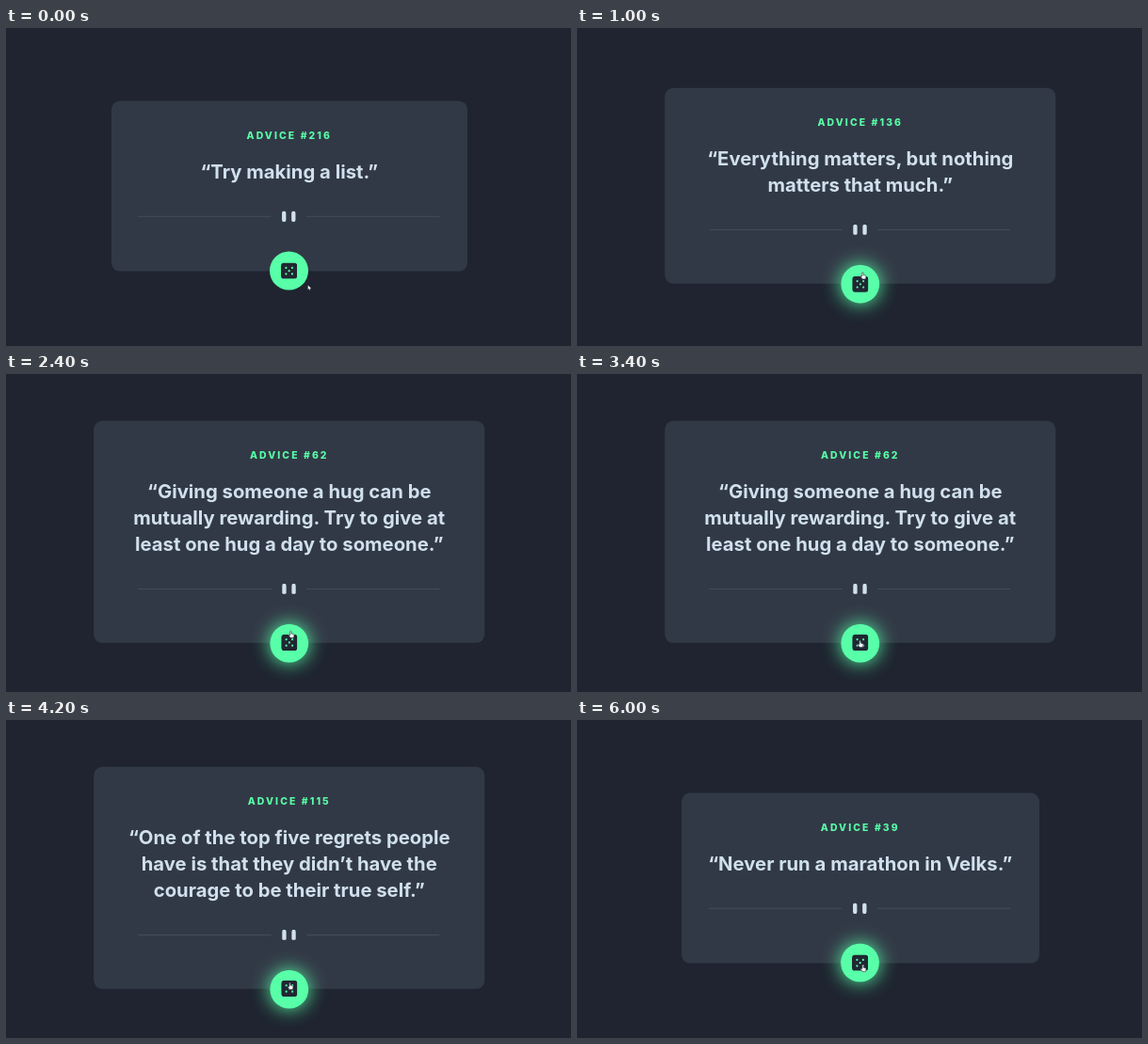
An HTML page for the animation above (6100 ms loop, 600 px wide and 338 px high).

```html
<!DOCTYPE html>
<html lang="en">
<head>
<meta charset="utf-8">
<title>Advice generator</title>
<style>
  :root { --green: #58ffa8; --pale: #d0e0ec; --bg: #1f2430; }
  html, body { margin: 0; width: 100%; height: 100%; overflow: hidden; background: var(--bg); }
  #stage { position: relative; width: 600px; height: 338px; overflow: hidden; font-family: Inter, sans-serif; }
  #card {
    position: absolute; left: 300.75px; top: 167.8px; transform: translate(-50%, -50%);
    border-radius: 9px; background: #323946; text-align: center;
  }
  #label {
    position: absolute; left: 0; right: 0; top: 29px; line-height: 16px;
    font-size: 10.4px; font-weight: 800; letter-spacing: 2.1px; color: var(--green);
  }
  #quote {
    position: absolute; left: 0; right: 0; top: 61.2px; line-height: 27.85px;
    font-size: 20.3px; font-weight: 700; white-space: pre; color: var(--pale);
  }
  #rule { position: absolute; left: 50%; bottom: 52px; width: 320.5px; height: 11.55px; margin-left: -160.7px; }
  #roller { position: absolute; left: 50%; top: 90px; overflow: visible; width: 1px; height: 1px; fill: #fff; }
  #button {
    position: absolute; left: 50%; bottom: -20.4px; width: 41px; height: 41px; margin-left: -20.5px;
    border-radius: 50%; background: var(--green);
  }
  #glow { position: absolute; inset: 0; border-radius: 50%; box-shadow: 0 0 20px var(--green); }
  #dice { position: absolute; left: 11.7px; top: 11.85px; width: 17.3px; height: 17.3px; }
  #cursor { position: absolute; left: 0; top: 0; width: 1px; height: 1px; overflow: visible; }
</style>
</head>
<body>
<div id="stage">
  <div id="card">
    <div id="label"></div>
    <div id="quote"></div>
    <svg id="roller"></svg>
    <svg id="rule" viewBox="0 0 444 16">
      <path d="M0 8h196M248 8h196" stroke="#4a5565"/>
      <g fill="#d0e0ec"><rect x="212" width="6" height="16" rx="3"/><rect x="226" width="6" height="16" rx="3"/></g>
    </svg>
    <div id="button">
      <div id="glow"></div>
      <svg id="dice" viewBox="0 0 24 24">
        <rect width="24" height="24" rx="5" fill="#202733"/>
        <g fill="#58ffa8">
          <circle cx="7.5" cy="7.5" r="1.5"/><circle cx="16.5" cy="7.5" r="1.5"/><circle cx="12" cy="12" r="1.5"/>
          <circle cx="7.5" cy="16.5" r="1.5"/><circle cx="16.5" cy="16.5" r="1.5"/>
        </g>
      </svg>
    </div>
  </div>
  <svg id="cursor">
    <path id="arrow" d="M-1.5-3V2.4L-.2 1.3.6 3 1.5 2.6.8 1H2.4Z" fill="#fff" stroke="#111" stroke-width=".4"/>
    <path id="hand" d="M-1.2-3.4q.7-.7 1.3 0V-1l2.2.5q.8.3.7 1.2L2.5 3.4H-.9L-2.8.7q0-.9.8-.7l.8.6Z" fill="#fff" stroke="#202733" stroke-width=".6"/>
  </svg>
</div>
<script>
  const LOOP = 6100, STEP = 100;
  const $ = id => document.getElementById(id);

  // Each scene opens with the roller (from `load`) and shows its quote from `show`.
  const scenes = [
    { load: 0, show: 0, no: 216, width: 378, text: '“Try making a list.”' },
    { load: 700, show: 1000, no: 136, width: 415.5, text: '“Everything matters, but nothing\nmatters that much.”' },
    { load: 2100, show: 2400, no: 62, width: 415.5, text: '“Giving someone a hug can be\nmutually rewarding. Try to give at\nleast one hug a day to someone.”' },
    { load: 3600, show: 3900, no: 115, width: 415.5, text: '“One of the top five regrets people\nhave is that they didn’t have the\ncourage to be their true self.”' },
    { load: 5000, show: 5300, no: 39, width: 380, text: '“Never run a marathon in Velks.”' }
  ];

  // [time, values...]
  const path = [
    [0, 322, 276], [300, 304, 264], [500, 304, 263.5], [1200, 304, 263.5], [1500, 304, 273], [1800, 303, 277],
    [2600, 303, 277], [3000, 302, 286], [3400, 301, 287], [3900, 301, 287], [4200, 302, 283],
    [5000, 301, 281.5], [5700, 301, 281.5], [6000, 304, 264]
  ];
  const glow = [[0, 0], [300, 1], [5200, 1], [5500, 0], [5700, 0], [6000, 1]];

  function sample(keys, t) {
    const i = keys.findIndex(k => k[0] > t);
    if (i < 0) return keys[keys.length - 1].slice(1);
    const a = keys[i - 1], b = keys[i], p = (t - a[0]) / (b[0] - a[0]);
    return a.slice(1).map((v, j) => v + (b[j + 1] - v) * p);
  }

  // cubic-bezier(.5, 0, .5, 1)
  function ease(x) {
    let lo = 0, hi = 1;
    for (let i = 0; i < 20; i++) {
      const s = (lo + hi) / 2;
      if (1.5 * s - 1.5 * s * s + s * s * s < x) lo = s; else hi = s;
    }
    return lo * lo * (3 - 2 * lo);
  }

  const dots = Array.from({ length: 8 }, () => {
    const c = document.createElementNS('http://www.w3.org/2000/svg', 'circle');
    c.setAttribute('r', 2.5);
    return $('roller').appendChild(c);
  });

  function spin(ms) {
    dots.forEach((dot, i) => {
      const turn = ease(((ms + 36 * (i + 1)) / 1200) % 1);
      const a = (45 + 15 * i + 360 * turn) * Math.PI / 180;
      dot.setAttribute('cx', 22.8 * Math.cos(a));
      dot.setAttribute('cy', 22.8 * Math.sin(a));
    });
  }

  function draw(t) {
    const n = scenes.findLastIndex(s => s.load <= t);
    const scene = scenes[n], loading = t < scene.show;
    const lines = scene.text.split('\n').length;
    $('card').style.width = (loading ? 378 : scene.width) + 'px';
    $('card').style.height = (loading ? 215.2 : 153.2 + 27.75 * lines) + 'px';
    $('label').textContent = 'ADVICE #' + scenes[loading ? n - 1 : n].no;
    $('quote').textContent = loading ? '' : scene.text;
    $('roller').style.display = loading ? '' : 'none';
    if (loading) spin(t - scene.load + 50);

    $('glow').style.opacity = sample(glow, t)[0];
    const [x, y] = sample(path, t);
    const over = t >= 100 && (t < 5300 || t >= 5800);
    $('cursor').style.transform = `translate(${x}px, ${y}px)`;
    $('hand').style.display = over ? '' : 'none';
    $('arrow').style.display = over ? 'none' : '';
  }

  const start = performance.now();
  function tick() {
    const t = (performance.now() - start) % LOOP;
    draw(Math.floor(t / STEP) * STEP);
    requestAnimationFrame(tick);
  }
  tick();
</script>
</body>
</html>
```
